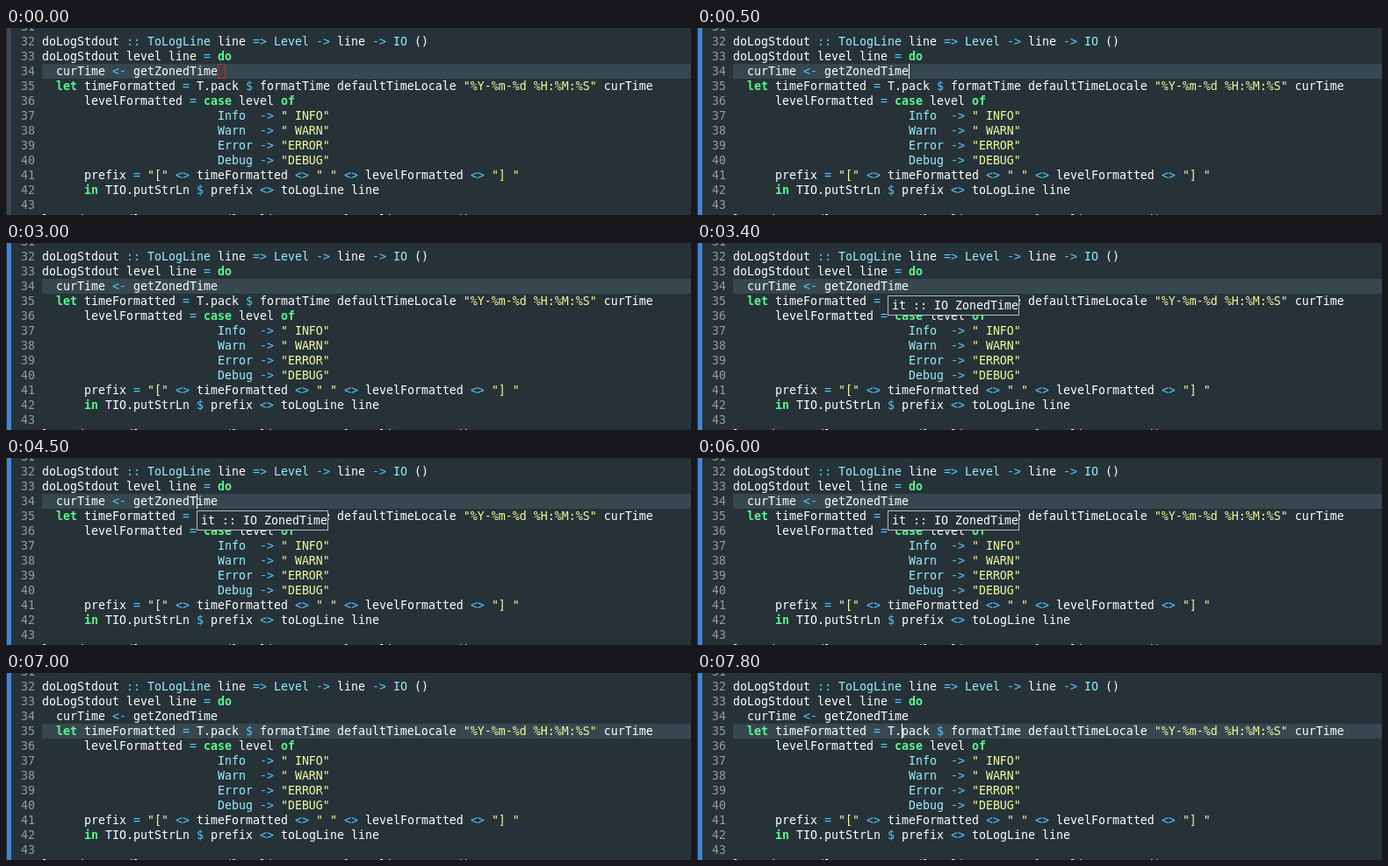
Recreate the animation shown at these times as an HTML page. Size 780x214 px, loop 8 s.

```html
<!DOCTYPE html>
<html lang="en">
<head>
<meta charset="utf-8">
<title>Type at cursor</title>
<style>
  html, body { margin: 0; width: 100%; height: 100%; overflow: hidden; background: #263238; }
  #stage {
    position: relative; width: 780px; height: 214px; overflow: hidden;
    background: #263238; color: #fff;
    font: 13.29px/17px "DejaVu Sans Mono", monospace;
    font-variant-ligatures: none; white-space: pre;
  }
  #stage div { position: absolute; box-sizing: border-box; height: 17px; }
  #edge { left: 1px; width: 5px; height: 214px !important; }
  #active { left: 41px; width: 739px; background: #37474f; }
  .number { left: 17px; color: #909da3; }
  .code { left: 41px; }
  .keyword { color: #5af78e; font-weight: bold; }
  .type { color: #9aedfe; }
  .string { color: #f3f99d; }
  .operator { color: #57c7ff; }
  #caret { width: 1px; background: #fff; }
  #box { left: 241px; top: 41px; width: 9px; border: 1px solid #c62828; }
  #tip {
    left: 217px; top: 60px; width: 150px; height: 23px !important;
    padding: 2px 0 2px 4px; border: 1px solid #b4bcc0; background: #263238;
  }
</style>
</head>
<body>
<div id="stage"><div id="edge"></div><div id="active"></div></div>
<script>
const FIRST_LINE = 31, ROW = 17, COLUMN = 8, LEFT = 41, LOOP = 8000;
const source = String.raw`
doLogStdout :: ToLogLine line => Level -> line -> IO ()
doLogStdout level line = do
  curTime <- getZonedTime
  let timeFormatted = T.pack $ formatTime defaultTimeLocale "%Y-%m-%d %H:%M:%S" curTime
      levelFormatted = case level of
                         Info  -> " INFO"
                         Warn  -> " WARN"
                         Error -> "ERROR"
                         Debug -> "DEBUG"
      prefix = "[" <> timeFormatted <> " " <> levelFormatted <> "] "
      in TIO.putStrLn $ prefix <> toLogLine line

logStdoutHandler :: LogHandler line => Level -> line -> IO ()`;

const stage = document.getElementById("stage");
const rowTop = line => -10 + (line - FIRST_LINE) * ROW;

function add(name, text = "", parent = stage, tag = "div") {
  const node = parent.appendChild(document.createElement(tag));
  node.className = name;
  node.textContent = text;
  return node;
}

function addOverlay(id, text) {
  const node = add("", text);
  node.id = id;
  return node;
}

const tokens = /(?<string>"[^"]*")|(?<keyword>\b(?:do|let|case|of|in)\b)|(?<type>\b[A-Z]\w*\b(?!\.))|(?<operator>[:=<>$-]+)|[\w.]+|[ ()]+/g;

source.split("\n").forEach((text, i) => {
  const line = FIRST_LINE + i, top = rowTop(line) + "px";
  add("number", line).style.top = top;
  const code = add("code");
  code.style.top = top;
  for (const match of text.matchAll(tokens)) {
    const kind = Object.keys(match.groups).find(key => match.groups[key]);
    add(kind || "", match[0], code, "span");
  }
});

const edge = document.getElementById("edge");
const active = document.getElementById("active");
const box = addOverlay("box");
const caret = addOverlay("caret");
const tip = addOverlay("tip", "it :: IO ZonedTime");

// Each step: start time, caret line, caret column (null while hidden).
const steps = [
  [0, 34, null], [500, 34, 25], [1000, 34, null], [1500, 34, 25],
  [1600, 34, 24], [1840, 34, 23], [2140, 34, 22], [3000, 34, null],
  [3500, 34, 22], [4200, 34, null], [4500, 34, 22], [5000, 34, null],
  [5500, 34, 22], [6000, 34, null], [6070, 35, 22], [7000, 35, null],
  [7400, 35, 23], [7800, 35, 24]
];

const show = (node, visible) => { node.style.display = visible ? "block" : "none"; };

function draw(now) {
  const time = now % LOOP;
  const [, line, column] = steps.findLast(([start]) => start <= time);
  const focused = time >= 500;
  edge.style.background = focused ? "#4084d6" : "#404552";
  active.style.top = caret.style.top = rowTop(line) + "px";
  caret.style.left = LEFT + column * COLUMN + "px";
  show(caret, column !== null);
  show(box, !focused);
  show(tip, time >= 3400 && time < 6070);
}

const begin = performance.now();
function tick() {
  draw(performance.now() - begin);
  requestAnimationFrame(tick);
}
tick();
</script>
</body>
</html>
```
